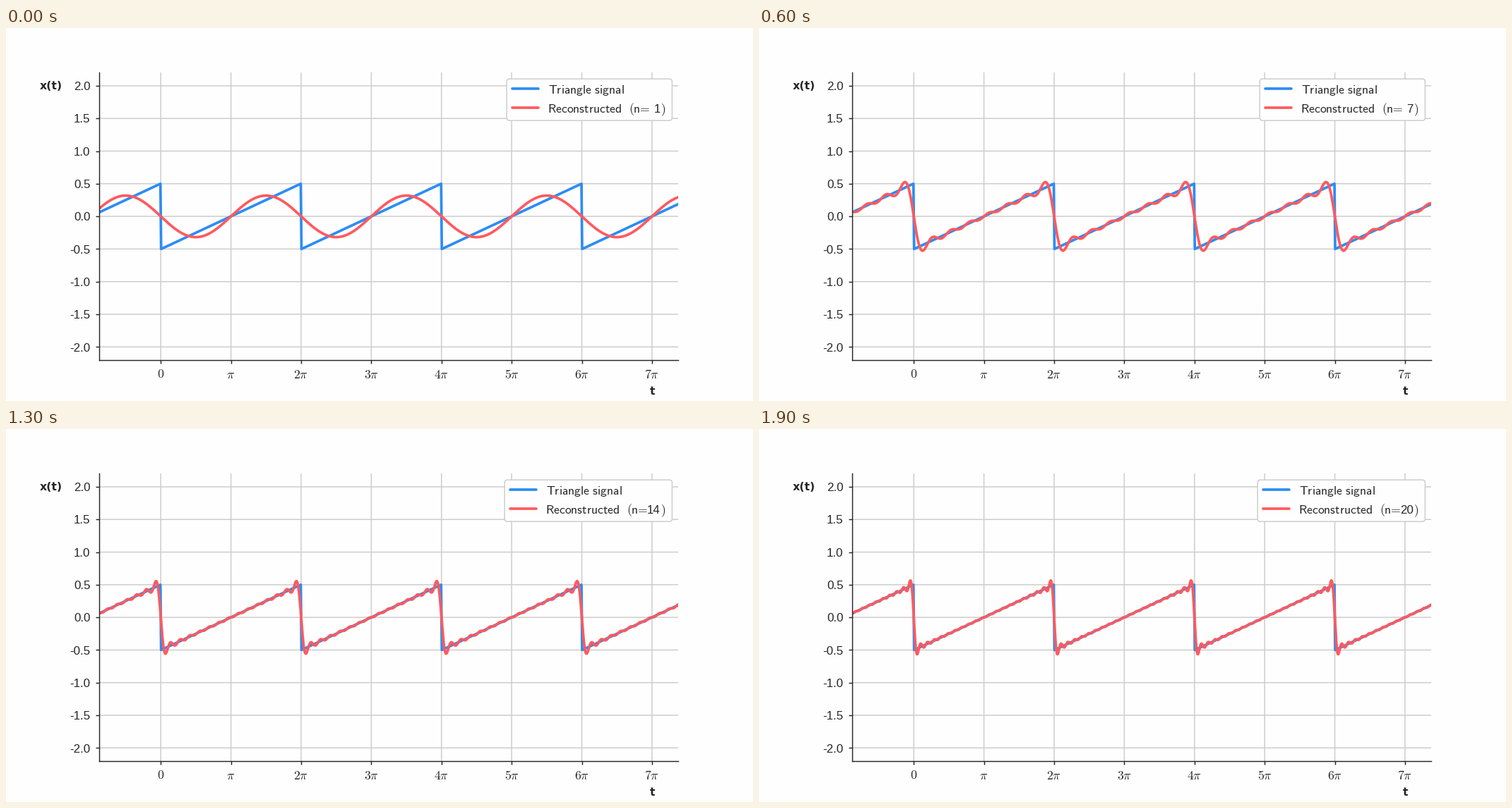
A matplotlib script for the animation above (2000 ms loop, 1058 by 529 pixels).

```python
import numpy as np
import matplotlib.pyplot as plt
from matplotlib.animation import FuncAnimation
from matplotlib.patches import FancyBboxPatch

plt.rcParams["mathtext.fontset"] = "cm"
plt.rcParams["font.family"] = "Liberation Sans"

W, H = 1058, 529
FRAMES, INTERVAL = 20, 100
BLUE, RED = "#2d8cf4", "#ff5a5f"
INK, GRID, PAPER = "#262626", "#cccccc", "#fefefe"

# At 72 dpi one point is one pixel.
fig = plt.figure(figsize=(W / 72, H / 72), dpi=72, facecolor=PAPER)
ax = fig.add_axes([0.125, 0.11, 0.775, 0.77], facecolor=PAPER)
ax.set_xlim(-0.875 * np.pi, 7.375 * np.pi)
ax.set_ylim(-2.2, 2.2)
ax.set_axisbelow(True)
ax.grid(color=GRID, linewidth=1.47)
ax.spines[["top", "right"]].set_visible(False)
ax.spines[["left", "bottom"]].set_color(INK)
ax.spines[["left", "bottom"]].set_linewidth(1.47)
ax.tick_params(color=INK, length=5.2, width=1.47)
ax.set_xticks(np.arange(8) * np.pi, [])
ax.set_yticks(np.arange(-2, 2.5, 0.5), [])
for line in (*ax.get_xgridlines(), *ax.get_ygridlines(),
             *ax.get_xticklines(), *ax.get_yticklines()):
    line.set_snap(False)

overlay = fig.add_axes([0, 0, 1, 1], facecolor="none")
overlay.set_xlim(0, W)
overlay.set_ylim(H, 0)
overlay.axis("off")


def label(x, y, text, size, ha="left", **kw):
    return overlay.text(x, y, text, fontsize=size, ha=ha, va="baseline",
                        color=INK, **kw)


def sans(text):
    return r"$\mathsf{" + text.replace(" ", r"\ ") + "}$"


for i in range(8):
    name = "0" if i == 0 else (str(i) if i > 1 else "") + r"\pi"
    label(219.2 + 99.39 * i, 496.4, f"${name}$", 17.8, ha="center")
for i in range(9):
    label(119.6, 88.2 + 46.3 * i, f"{2 - i / 2:.1f}", 16.9, ha="right")
label(48, 86.6, "x(t)", 15.6, family="DejaVu Sans", weight="bold")
label(915, 520.2, "t", 15.6, ha="center", family="DejaVu Sans", weight="bold")

# Sawtooth with near-vertical drops at multiples of 2 pi.
drops = 2 * np.pi * np.arange(-1, 5)
saw_t = np.column_stack([drops - 0.015, drops + 0.015]).ravel()
saw_y = np.tile([0.5, -0.5], len(drops))
stroke = dict(linewidth=3.7, solid_capstyle="round", solid_joinstyle="round")
ax.plot(saw_t, saw_y, color=BLUE, **stroke)

t = np.linspace(-3, 23.5, 2400)
wave, = ax.plot([], [], color=RED, **stroke)

box = FancyBboxPatch((0, 0), 1, 1, boxstyle="round,pad=0,rounding_size=4",
                     facecolor=PAPER, edgecolor=GRID, linewidth=1.47)
overlay.add_patch(box)
keys = [overlay.plot([], [], color=c, **stroke)[0] for c in (BLUE, RED)]
title = label(0, 93, sans("Triangle signal"), 17.65)
recon = label(0, 120, sans("Reconstructed"), 17.65)
opening = label(0, 120, r"$\mathsf{(n}\text{=}$", 17.65)
count = label(926.8, 120, "", 16.9, ha="right")
label(934.6, 120, sans(")"), 17.65, ha="right")


def update(i):
    n = i + 1
    k = np.arange(1, n + 1)[:, None]
    wave.set_data(t, -(np.sin(k * t) / k).sum(axis=0) / np.pi)

    left = 709.2 if n < 10 else 706.2
    box.set_bounds(left, 72.2, 943.4 - left, 59)
    for key, y in zip(keys, (86.3, 113.1)):
        key.set_data([left + 7.8, left + 44.3], [y, y])
    title.set_x(left + 58.6)
    recon.set_x(left + 57.8)
    opening.set_x(left + 172.5)
    count.set_text(str(n))
    return wave, box, *keys, title, recon, opening, count


anim = FuncAnimation(fig, update, frames=FRAMES, interval=INTERVAL,
                     repeat=True, repeat_delay=0, blit=False)
plt.show()
```
